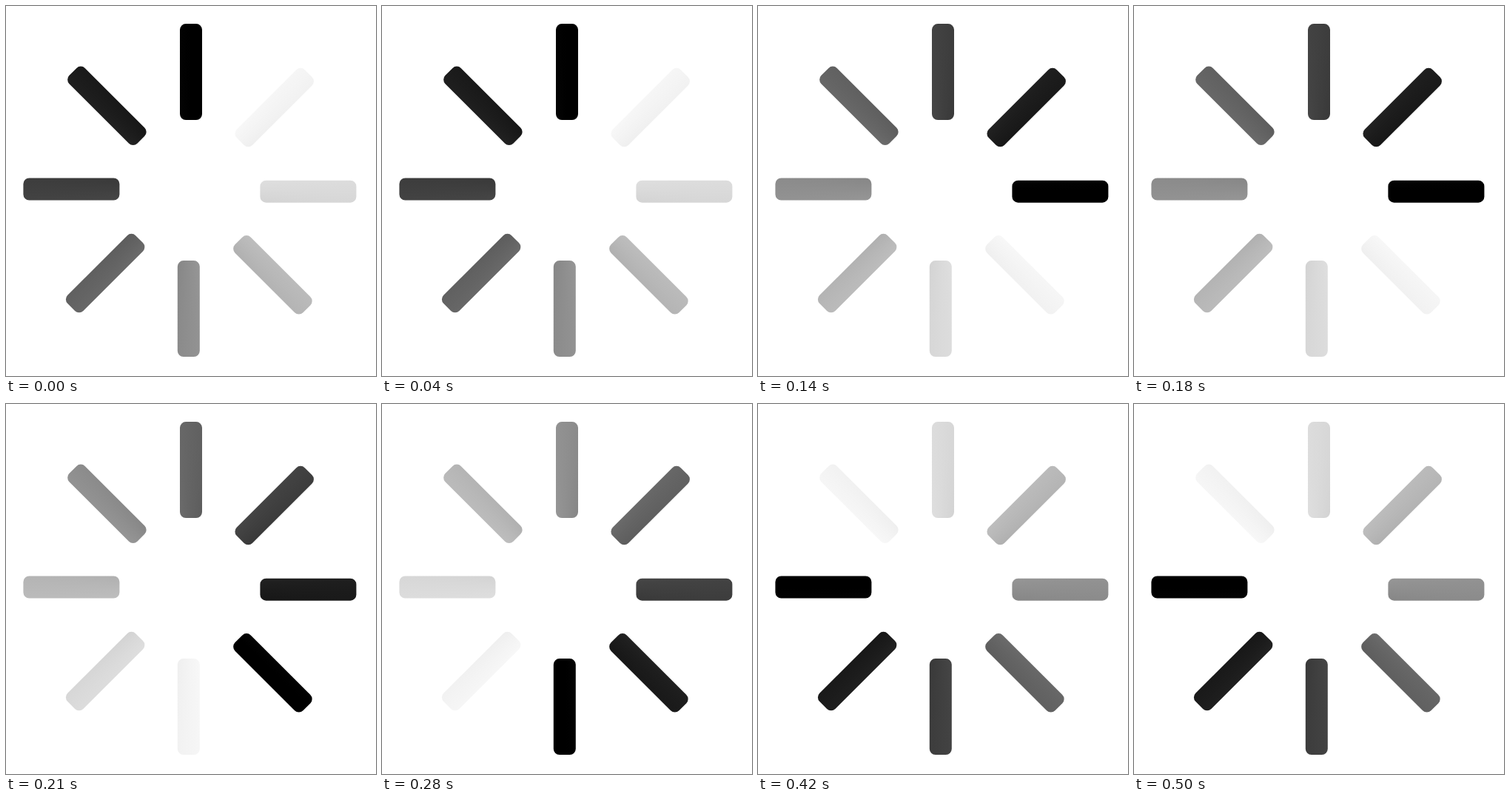
An HTML page with a canvas that plays this animation: 500 by 500 pixels, repeating every 0.56 s.

```html
<!DOCTYPE html>
<html lang="en">
<head>
<meta charset="utf-8">
<title>Spinner</title>
<style>
  html, body { margin: 0; width: 100%; height: 100%; overflow: hidden; background: #fff; }
  canvas { display: block; }
</style>
</head>
<body>
<canvas id="stage" width="500" height="500"></canvas>
<script>
const ctx = document.getElementById('stage').getContext('2d');
const CX = 248.4, CY = 249.1;
const STEP = 70, LOOP = 560, BARS = 8;
// Grey level by distance behind the head, in bars
const GREYS = [0, 28, 64, 100, 143, 184, 218, 244];
const TURN = 2 * Math.PI / BARS;

const bars = new Path2D();
const bar = new Path2D();
bar.roundRect(-13.4, -225, 30, 130, 8);
for (let i = 0; i < BARS; i++) {
  bars.addPath(bar, new DOMMatrix().translate(CX, CY).rotate(i * 360 / BARS));
}

// Angular fade that ends hard, half a bar ahead of the head
function fade(head) {
  const g = ctx.createConicGradient((head + 0.5) * TURN - Math.PI / 2, CX, CY);
  g.addColorStop(0, '#fff');
  GREYS.forEach((v, age) =>
    g.addColorStop((BARS - 0.5 - age) / BARS, `rgb(${v}, ${v}, ${v})`));
  g.addColorStop(1, '#000');
  return g;
}

function draw(t) {
  // The last position is held for two steps
  const head = Math.min(6, Math.floor((t % LOOP) / STEP));
  ctx.fillStyle = '#fff';
  ctx.fillRect(0, 0, 500, 500);
  ctx.fillStyle = fade(head);
  ctx.fill(bars);
}

const start = performance.now();
function tick() {
  draw(performance.now() - start);
  requestAnimationFrame(tick);
}
tick();
</script>
</body>
</html>
```
